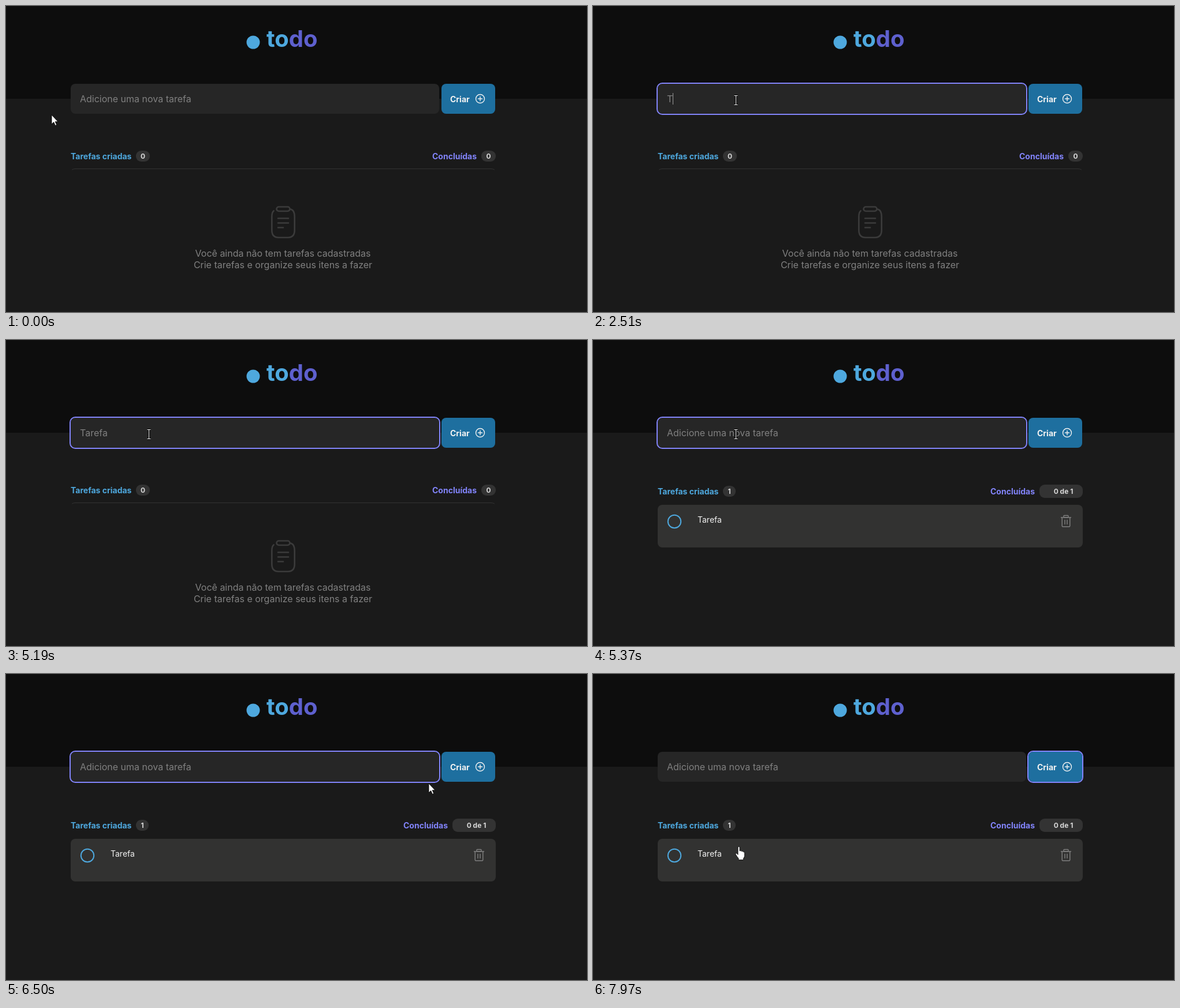
An HTML page that plays this animation: 1006 px wide and 531 px high, repeating every 8 s.

```html
<!DOCTYPE html>
<html lang="pt-BR">
<head>
<meta charset="utf-8">
<title>todo</title>
<style>
  html, body { margin: 0; height: 100%; overflow: hidden; background: #1a1a1a; }
  svg { display: block; width: 1006px; height: 531px; font: 14px Inter, sans-serif; font-optical-sizing: none; }
  .bold { font-weight: 700; }
  .gray { font-size: 16px; fill: #808080; }
  .mid { text-anchor: middle; }
  .count { font-size: 12px; fill: #d9d9d9; }
  .blue { fill: #4ea8de; }
  .violet { fill: #8284fa; }
  .badge { fill: #333; }
  .line { fill: none; stroke-linecap: round; stroke-linejoin: round; }
  .shape { fill: #fff; stroke: #000; stroke-width: .8; }
</style>
</head>
<body>
<svg viewBox="0 0 1006 531">
  <rect width="1006" height="161" fill="#0d0d0d"/>
  <circle class="blue" cx="428" cy="63" r="11.5"/>
  <text class="bold blue" x="451" y="71" font-size="40">to<tspan fill="#5e60ce">do</tspan></text>

  <rect x="112" y="135" width="638" height="52" rx="8" fill="#262626"/>
  <text id="field" class="gray" x="128" y="167"></text>
  <rect id="caret" y="151" width="1" height="20" fill="#9a9a9a"/>
  <rect x="754" y="135" width="93" height="52" rx="8" fill="#1e6f9f"/>
  <text class="bold" x="769" y="167" fill="#f2f2f2">Criar</text>
  <g class="line" stroke="#f2f2f2" stroke-width="1.4">
    <circle cx="821" cy="161" r="7.5"/>
    <path d="M817.5 161h7M821 157.5v7"/>
  </g>
  <rect id="ring" y="134" height="54" rx="9" fill="none" stroke="#8284fa" stroke-width="2"/>

  <g id="empty">
    <text class="bold blue" x="112" y="266">Tarefas criadas</text>
    <rect class="badge" x="225" y="251" width="24" height="19" rx="9"/>
    <text class="bold count mid" x="237" y="265">0</text>
    <text class="bold violet" x="738" y="266">Concluídas</text>
    <rect class="badge" x="823" y="251" width="25" height="19" rx="9"/>
    <text class="bold count mid" x="835.5" y="265">0</text>
    <path class="line" stroke="#333" d="M114.5 284Q117 282.5 120 282.5H840Q843 282.5 845.5 284"/>
    <g class="line" stroke="#3b3b3b" stroke-width="2.6">
      <rect x="468.5" y="348.5" width="23" height="7.5" rx="3.75"/>
      <path d="M463.5 355.5Q460.3 358 460.3 366V389Q460.3 401.7 472 401.7H488Q499.7 401.7 499.7 389V366Q499.7 353 491.5 352.5M471 368.5h18M471 376.5h18M471 384.5h9"/>
    </g>
    <text class="gray mid" x="479.5" y="435">Você ainda não tem tarefas cadastradas</text>
    <text class="gray mid" x="479.5" y="455">Crie tarefas e organize seus itens a fazer</text>
  </g>

  <g id="list">
    <text class="bold blue" x="112" y="268">Tarefas criadas</text>
    <rect class="badge" x="225" y="253" width="22" height="19" rx="9"/>
    <text class="bold count mid" x="236" y="267">1</text>
    <text class="bold violet" x="688" y="268">Concluídas</text>
    <rect class="badge" x="773" y="251" width="75" height="23" rx="9"/>
    <text class="bold count mid" x="814.5" y="267">0 de 1</text>
    <rect x="112" y="286" width="736" height="74" rx="8" fill="#323231"/>
    <circle cx="141" cy="315" r="11.2" fill="none" stroke="#4ea8de" stroke-width="2"/>
    <text x="181" y="317" fill="#f2f2f2">Tarefa</text>
    <g class="line" stroke="#808080" stroke-width="1.4">
      <rect x="815" y="304.5" width="8" height="3.5" rx="1"/>
      <path d="M810.5 308h17M812.2 308v14.5q0 1.5 1.5 1.5h10.6q1.5 0 1.5-1.5V308M817 312.5v7M821 312.5v7"/>
    </g>
  </g>

  <g id="pointer">
    <path id="arrow" class="shape" d="M0 0V16L3.7 12.5L6.3 18.4L8.7 17.3L6.2 11.7H11Z"/>
    <g id="beam">
      <path id="bar" d="M-2.5-7.5h6m-3 0v16m-3 0h6" fill="none" stroke-width="3" style="stroke: #000"/>
      <path d="M-2.5-7.5h6m-3 0v16m-3 0h6" fill="none" stroke="#fff"/>
    </g>
    <path id="hand" class="shape" d="M-2 1Q-2-.5-.5-.5T1 1V7Q3.5 5.8 4.5 7.8Q6.5 6.8 7.3 8.8Q9.8 8 9.5 11V16Q9 18 7.5 20V22.5H-1V20Q-4 16.5-6 13Q-6.8 10.5-4.5 11L-2 13.5Z"/>
  </g>
  <circle id="press" r="12" fill="#ff0" opacity=".52"/>
</svg>
<script>
const el = id => document.getElementById(id);
const show = (id, on) => el(id).style.display = on ? '' : 'none';
const set = (id, attrs) => {
  for (const name in attrs) el(id).setAttribute(name, attrs[name]);
};

const FOCUS = 330, ENTER = 5370, CREATE = 6940, BLINK = 525, HOLD = 130;
const WORD = 'Tarefa';
const keys = [2510, 3180, 3380, 3490, 4530, 4660];

// Pointer moves: start, end, x, y
const start = [79, 189];
const moves = [
  [30, 300, 247, 163],
  [6010, 6190, 456, 206],
  [6190, 6560, 784, 187],
  [6720, 6880, 785, 170],
  [7600, 7970, 253, 300]
];

function pointerAt(t) {
  let [x, y] = start;
  for (const [from, to, toX, toY] of moves) {
    const k = Math.min(1, Math.max(0, (t - from) / (to - from)));
    x += (toX - x) * k;
    y += (toY - y) * k;
  }
  return [Math.round(x), Math.round(y)];
}

function drawField(t) {
  const typed = t < ENTER ? WORD.slice(0, keys.filter(k => t >= k).length) : '';
  const field = el('field');
  field.textContent = typed || 'Adicione uma nova tarefa';
  const width = typed ? field.getComputedTextLength() : 0;
  set('caret', { x: Math.round(128 + width) });

  // Each click or key restarts the blinking
  const last = Math.max(...[FOCUS, ...keys].filter(k => t >= k));
  const lit = Math.floor((t - last) / BLINK) % 2 === 0;
  show('caret', t >= FOCUS && t < CREATE && lit);
}

function drawPointer(t) {
  const [x, y] = pointerAt(t);
  const beam = x > 112 && x < 750 && y > 135 && y < 187;
  const hand = t >= ENTER && y > 286;
  set('pointer', { transform: `translate(${x} ${y})` });
  show('beam', beam);
  show('hand', hand);
  show('arrow', !beam && !hand);
  set('press', { cx: x - 1, cy: y - 1 });
  show('press', [FOCUS, CREATE].some(c => t >= c && t < c + HOLD));
}

function draw(t) {
  drawField(t);
  set('ring', t < CREATE ? { x: 111, width: 640 } : { x: 753, width: 95 });
  show('ring', t >= FOCUS);
  show('empty', t < ENTER);
  show('list', t >= ENTER);
  drawPointer(t);
}

function tick() {
  draw(performance.now() % 8000);
  requestAnimationFrame(tick);
}
tick();
</script>
</body>
</html>
```
